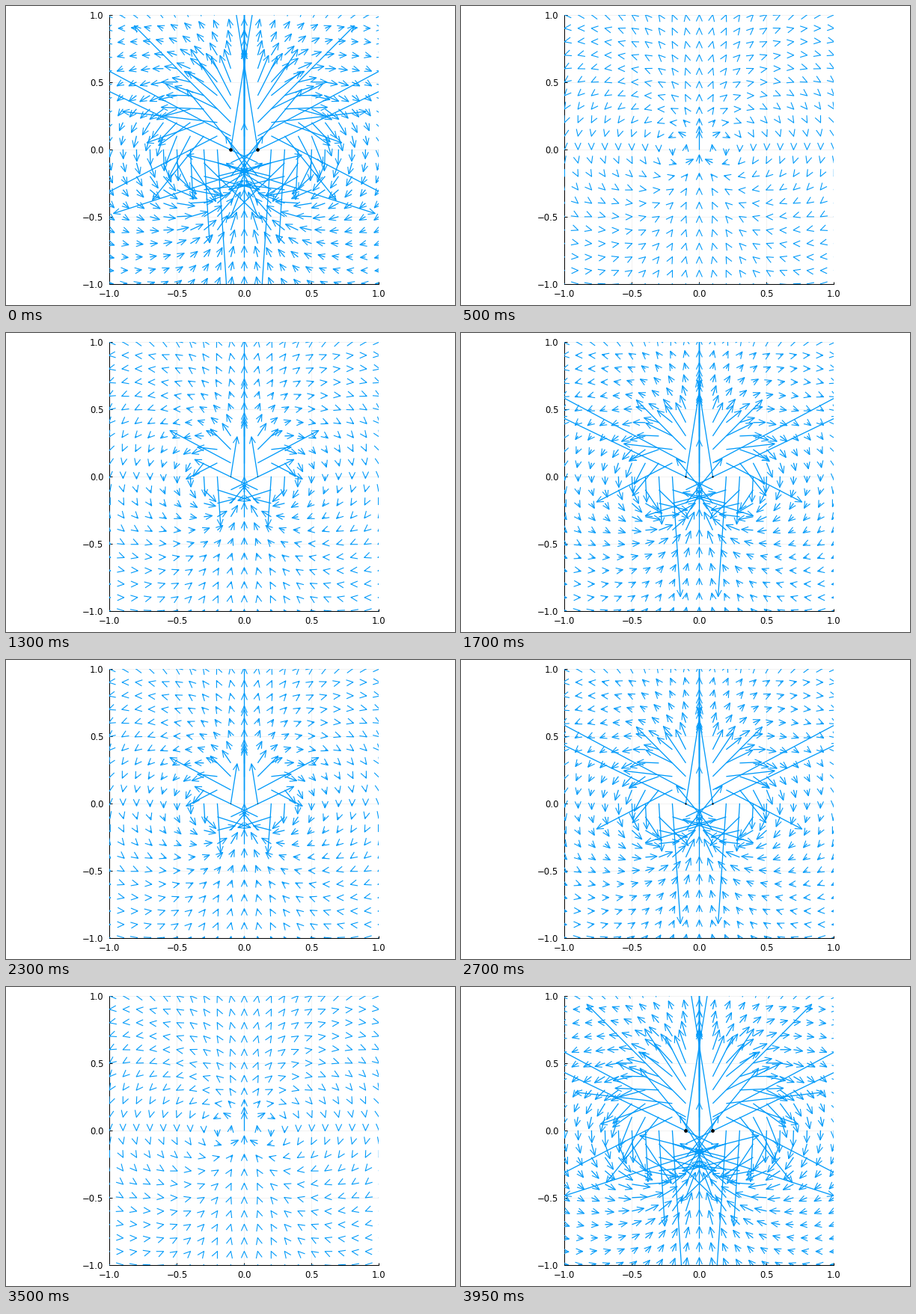
A matplotlib script for the animation above (4 s loop, 600x400 px).

```python
import numpy as np
import matplotlib.pyplot as plt
from matplotlib.animation import FuncAnimation
from matplotlib.collections import LineCollection

W, H, DPI = 600, 400, 100
PX = 72 / DPI                  # one pixel in points
UNIT = 180                     # pixels per data unit
FRAMES, PERIOD = 80, 20
BLUE = "#009afa"

COIL = 0.1                     # coil radius
SOFT = 0.001                   # keeps the field finite on a wire
# (x, y, current): driven coil and the weak opposing coil below it
WIRES = [(COIL, 0, 1), (-COIL, 0, -1),
         (COIL, -0.1, -0.1), (-COIL, -0.1, 0.1)]

HEAD_LEN, HEAD_HALF = 9 / UNIT, 4 / UNIT


def field(x, y):
    """Magnetic field of parallel wires; positive current turns clockwise."""
    bx, by = np.zeros_like(x), np.zeros_like(y)
    for wx, wy, current in WIRES:
        dx, dy = x - wx, y - wy
        k = current / (np.pi * (dx**2 + dy**2 + SOFT))
        bx += k * dy
        by -= k * dx
    return np.column_stack([bx, by])


ticks = np.linspace(-1, 1, 21)
gx, gy = (g.ravel() for g in np.meshgrid(ticks, ticks))
start = np.column_stack([gx, gy])
B = field(gx, gy)
along = B / np.hypot(B[:, 0], B[:, 1])[:, None]
across = np.column_stack([-along[:, 1], along[:, 0]])
barb_l = -HEAD_LEN * along + HEAD_HALF * across
barb_r = -HEAD_LEN * along - HEAD_HALF * across

plt.rcParams["font.family"] = "DejaVu Sans"
fig = plt.figure(figsize=(W / DPI, H / DPI), dpi=DPI, facecolor="white")
ax = fig.add_axes([138.4 / W, 1 - 371.8 / H, 2 * UNIT / W, 2 * UNIT / H])
ax.set(xlim=(-1, 1), ylim=(-1, 1))

marks = np.linspace(-1, 1, 5)
labels = [f"{m:.1f}".replace("-", "\u2212") for m in marks]
ax.set_xticks(marks, labels)
ax.set_yticks(marks, labels)
ax.tick_params(direction="in", length=3.5 * PX, width=PX, labelsize=8.4)
ax.tick_params(axis="x", pad=7 * PX)
ax.tick_params(axis="y", pad=8 * PX)
ax.spines[["top", "right"]].set_visible(False)
for side in ("left", "bottom"):
    ax.spines[side].set(linewidth=PX, zorder=1)
ax.set_axisbelow(True)
ax.grid(color="black", alpha=0.1, linewidth=0.5 * PX)

shafts = LineCollection([], colors=BLUE, linewidths=1.3 * PX, zorder=3)
heads = LineCollection([], colors=BLUE, linewidths=1.1 * PX, zorder=3)
ax.add_collection(shafts, autolim=False)
ax.add_collection(heads, autolim=False)
dots, = ax.plot([-COIL, COIL], [0, 0], "o", color="black", mew=0, zorder=4)


def draw(i):
    power = np.cos(np.pi * (i + 1) / PERIOD) ** 2
    visible = power > 1e-9
    for artist in (shafts, heads, dots):
        artist.set_visible(visible)
    if visible:
        tip = start + power * B
        shafts.set_segments(np.stack([start, tip], axis=1))
        heads.set_segments(np.stack([tip + barb_l, tip, tip + barb_r], axis=1))
        dots.set_markersize(4.8 * PX * power)
    return shafts, heads, dots


anim = FuncAnimation(fig, draw, frames=FRAMES, interval=50,
                     repeat=True, repeat_delay=0)
plt.show()
```
